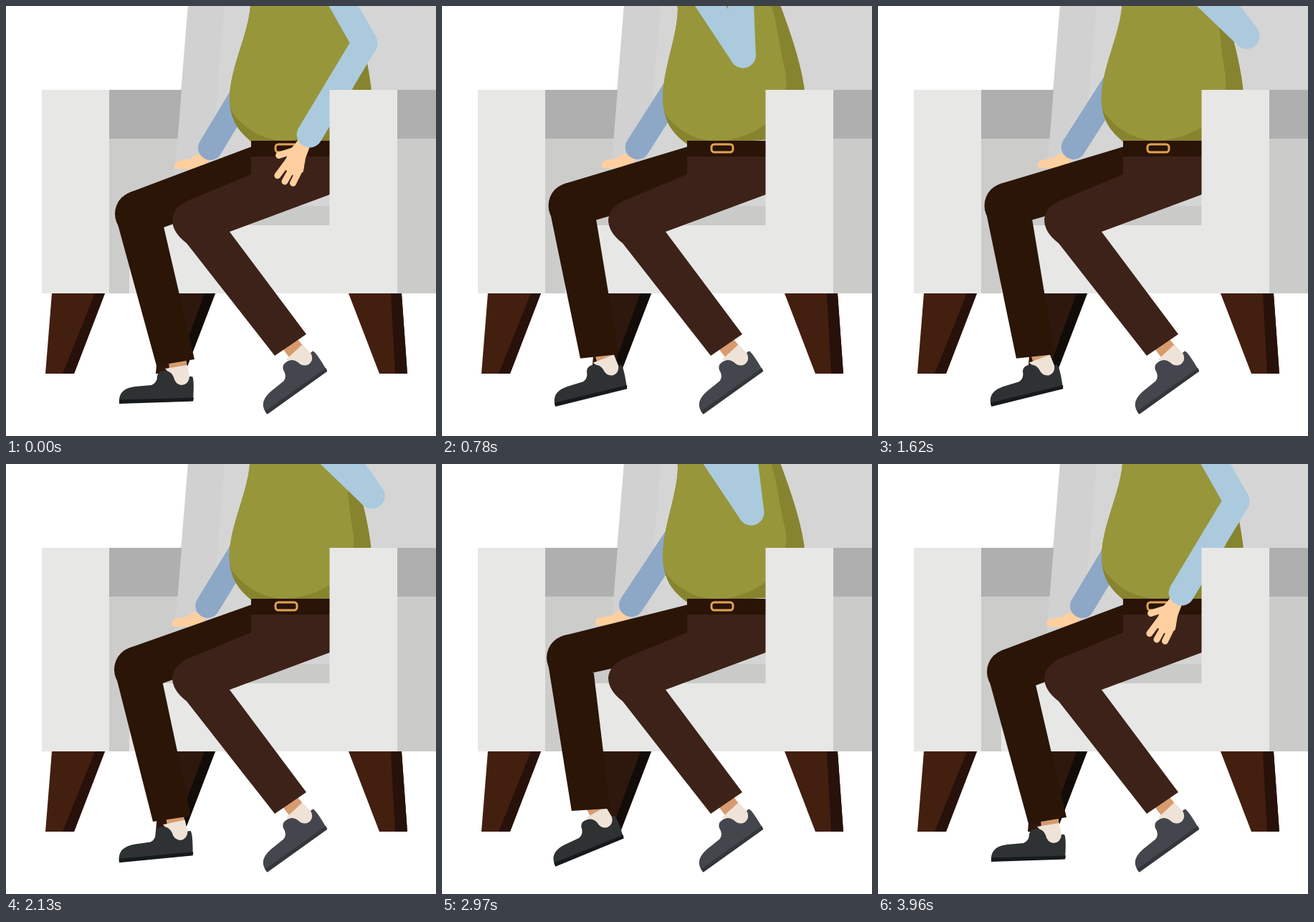
Write an HTML page that moves like this. It is 600 by 600 pixels and loops after 3990 ms.

```html
<!DOCTYPE html>
<html lang="en">
<head>
<meta charset="utf-8">
<title>Restless sitter</title>
<style>
html, body { margin: 0; width: 100%; height: 100%; overflow: hidden; background: #fff; }
svg { display: block; width: 100vw; height: 100vh; }
</style>
</head>
<body>
<svg viewBox="0 0 600 600">
  <defs>
    <g id="foot">
      <path fill="#d79b6d" d="M226 485H251L253 508H228Z"/>
      <path fill="#eee3d6" d="M222 506L253 501L256 518Q256 531 245 531Q233 529 230 515Z"/>
      <path d="M158 554Q156 534 180 531L203 529Q211 526 211 516Q213 508 223 509Q231 510 234 518Q236 528 245 529Q255 528 256 517L260 517Q263 521 261 551Z"/>
      <path fill="currentColor" d="M158 549.500L262 546.500L261 551.500L158 555Z"/>
    </g>
  </defs>

  <!-- sofa behind the sitter -->
  <path fill="#d5d5d5" d="M254 0H600V306H230Z"/>
  <path fill="#d1d1d1" d="M254 0H305L284 240H234Z"/>
  <path fill="#cccccb" d="M144 185H239L230 306V401H144Z"/>
  <path fill="#afafaf" d="M144 117H245L239.500 185H144Z"/>
  <path fill="#cacac9" d="M200 279H452V306H200Z"/>
  <path fill="#e7e7e5" d="M50 117H144V401H50ZM172 306H452V401H172Z"/>
  <path fill="#2e170d" d="M218 401H292L249 513H209Z"/>
  <path fill="#120c09" d="M277 401H292L249 513H236Z"/>
  <path fill="#431f10" d="M64 401H138L95 513H55Z"/>
  <path fill="#27110a" d="M124 401H138L95 513H79Z"/>

  <g id="farHand"><path fill="#ffcf9f" d="M-20 9L-27 15L-44 18Q-52 20 -49 29L-10 30L0 12Z"/></g>
  <path id="farArm" stroke="#8da7c7" stroke-width="34" stroke-linecap="round"/>

  <g id="torso">
    <path fill="#87842f" d="M341 -40V0C338 40 313 85 312 128C312 160 325 175 343 190H490Q511 160 510 120C507 80 492 30 483 0L480 -40Z"/>
    <path fill="#98963a" d="M341 -40V0C338 40 313 85 312 128Q312 140 316 149Q345 187 390 188Q440 184 468 156Q489 130 485 95C478 60 479 25 470 0V-40Z"/>
  </g>

  <use id="farFoot" href="#foot" fill="#2e3233" color="#171a1c"/>
  <path id="farShin" fill="#2a1507" d="M152.500 292L210 502L263 493L220 308L184 270Z"/>
  <path id="farThigh" fill="#2a1507"/>
  <circle id="farKnee" r="32" fill="#2a1507"/>

  <use href="#foot" fill="#43464c" color="#33363a" transform="translate(364 569) rotate(-33.7) translate(-158 -554)"/>
  <path fill="#2a1307" d="M342 188H452V212H342Z"/>
  <path fill="#3c2218" d="M342 210H452V263L312 315L419 458L375 488L252 331Q232 316 232 298Q234 280 255 271L342 235Z"/>
  <rect x="376" y="193" width="30" height="11" rx="4" fill="none" stroke="#e0a352" stroke-width="3"/>

  <g fill="none" stroke="#abcade" stroke-width="36" stroke-linecap="round">
    <path id="upperArm"/>
    <g id="forearm">
      <path fill="#ffcf9f" stroke="none" d="M-9 158H8L12 180L19 198L14 210L-8 208L-13 185Z"/>
      <path stroke="#ffcf9f" stroke-width="9" d="M-8 180L-22 196M-6 190L-9 221M3 195L4 223M13 195L15 219"/>
      <path d="M0 0V149"/>
    </g>
  </g>

  <!-- sofa arm in front -->
  <path fill="#e7e7e5" d="M451.500 117H547V401H451.500Z"/>
  <path fill="#afafaf" d="M546 117H600V185H546Z"/>
  <path fill="#cbcbca" d="M546 185H600V401H546Z"/>
  <path fill="#431f10" d="M478 401H552L560 513H521Z"/>
  <path fill="#27110a" d="M537 401H552L560 513H543Z"/>
</svg>
<script>
const LOOP = 3990, STEP = 30, TAP = 240, LAST_TAP = 3840;
const UPPER_ARM = 141;

// time, upper arm angle, forearm angle (both from straight down), lean
const KEYS = [
  [0, 29.5, -31, 0],
  [450, 1.6, -146, .85],
  [540, 2.3, -146.5, 1],
  [1110, 2.3, -146.5, 1],
  [1710, 39, -133, 0],
  [2030, 39, -133, 0],
  [2130, 35, -134, .08],
  [2700, 6.8, -147, 1],
  [2940, 6.8, -147, 1],
  [3450, 26.5, -56.5, .8],
  [3900, 29.5, -31, 0],
  [LOOP, 29.5, -31, 0]
];

const rad = deg => deg * Math.PI / 180;
const el = id => document.getElementById(id);
const set = (id, name, value) => el(id).setAttribute(name, value);

const slope = (i, c) => (KEYS[i + 1][c] - KEYS[i][c]) / (KEYS[i + 1][0] - KEYS[i][0]);

// harmonic mean of neighbouring slopes: smooth, never overshoots, flat at turns
function tangent(i, c) {
  if (i === 0 || i === KEYS.length - 1) return 0;
  const a = slope(i - 1, c), b = slope(i, c);
  return a * b > 0 ? 2 * a * b / (a + b) : 0;
}

function pose(t, c) {
  let i = 0;
  while (KEYS[i + 1][0] <= t) i++;
  const span = KEYS[i + 1][0] - KEYS[i][0], u = (t - KEYS[i][0]) / span, v = 1 - u;
  return KEYS[i][c] * (1 + 2 * u) * v * v + KEYS[i + 1][c] * (3 - 2 * u) * u * u
    + span * u * v * (tangent(i, c) * v - tangent(i + 1, c) * u);
}

function drawFarLimbs(t) {
  const p = t < LAST_TAP ? (1 - Math.cos(2 * Math.PI * t / TAP)) / 2 : 0;

  const hx = 285 - 24.5 * p, hy = 198 - 2 * p;
  set('farHand', 'transform', `translate(${hx} ${hy})`);
  set('farArm', 'd', `M${hx} ${hy}L${404 - 11 * p} 0`);

  const kx = 184 - 7 * p, ky = 290 - 23 * p;
  set('farKnee', 'cx', kx);
  set('farKnee', 'cy', ky);
  set('farThigh', 'd', `M342 196.500L${kx - 11 + 3 * p} ${ky - 30 - p}L${kx} ${ky}L${220 - 10 * p} ${309 - 21 * p}L342 262Z`);
  set('farShin', 'transform', `translate(${kx} ${ky}) rotate(${7.3 * p}) translate(-184 -290)`);
  set('farFoot', 'transform', `translate(158 ${554 + 8 * p}) rotate(${-24 * p}) translate(-158 -554)`);
}

function drawUpperBody(t) {
  const upper = rad(pose(t, 1)), fore = pose(t, 2), tilt = -3.7 * pose(t, 3);
  set('torso', 'transform', `rotate(${tilt} 400 188)`);

  // shoulder follows the lean about the hip
  const c = Math.cos(rad(tilt)), s = Math.sin(rad(tilt));
  const sx = 400 + 31 * c + 259 * s, sy = 188 + 31 * s - 259 * c;
  const ex = sx + UPPER_ARM * Math.sin(upper), ey = sy + UPPER_ARM * Math.cos(upper);
  set('upperArm', 'd', `M${sx} ${sy}L${ex} ${ey}`);
  set('forearm', 'transform', `translate(${ex} ${ey}) rotate(${-fore})`);
}

const start = performance.now();

function frame() {
  const t = Math.floor((performance.now() - start) % LOOP / STEP) * STEP;
  drawFarLimbs(t);
  drawUpperBody(t);
  requestAnimationFrame(frame);
}
frame();
</script>
</body>
</html>
```
